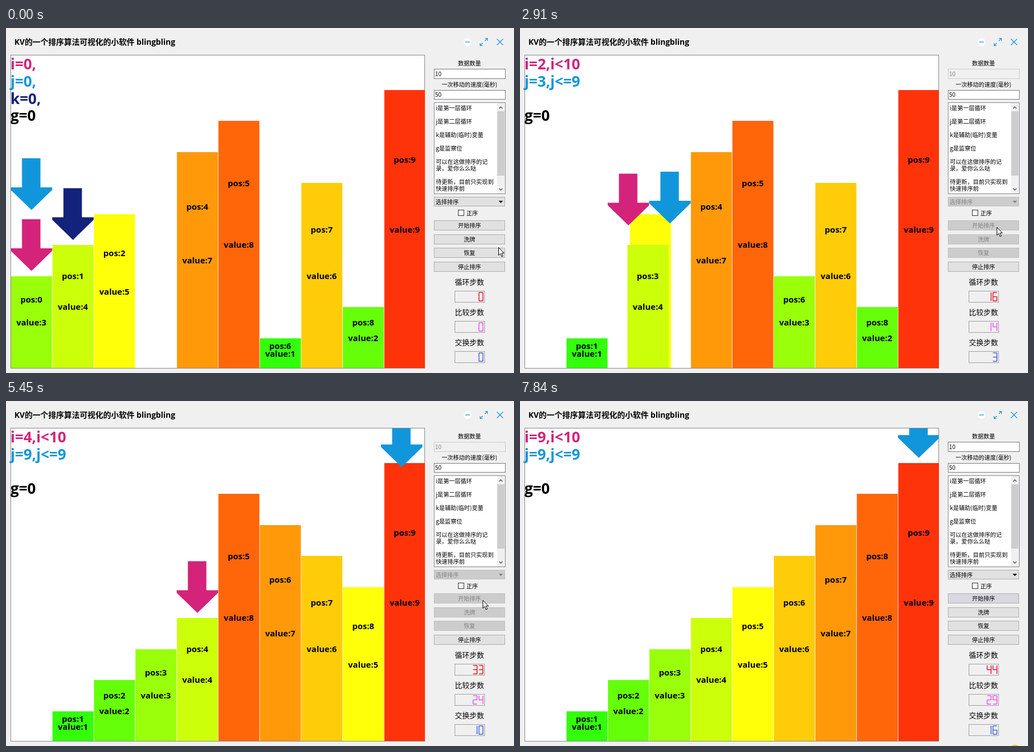
Animation of 907x617 px, one loop 8160 ms. Source, as an HTML page with a canvas:

```html
<!DOCTYPE html>
<html lang="zh">
<head>
<meta charset="utf-8">
<style>
html, body { margin: 0; width: 100%; height: 100%; overflow: hidden; background: #f0f0f0; }
canvas { display: block; }
</style>
</head>
<body>
<canvas id="stage" width="907" height="617"></canvas>
<script>
const ctx = document.getElementById('stage').getContext('2d');
const LOOP = 8160, TICK = 76.85;
const START = [3, 4, 5, 0, 7, 8, 1, 6, 2, 9];
const PINK = '#d4237a', BLUE = '#1296db', NAVY = '#13227a';
const CJK = '"Noto Sans CJK SC", "Noto Sans CJK JP", "Noto Sans CJK", sans-serif';
const BOLD = '"Open Sans", ' + CJK;
// Durations of the sorting steps, in ms
const MOVE = 77, SWAP = 184, NEXT = 24;
// [tick, sorting time] and [tick, x, y]
const CLOCK = [[10, 0], [29, 1385], [45, 2595], [56, 3420], [71, 4611], [84, 5605], [96, 6600]];
const MOUSE = [[0, 879, 392], [6, 851, 356], [79, 851, 356], [84, 849, 371], [87, 869, 440], [91, 905, 625]];

const clamp = v => Math.max(0, Math.min(1, v));
const barTop = v => 610.5 - 55.5 * v;
const tipOver = v => barTop(v) - 9.5;

function track(points, k, c = 1) {
  const n = points.findIndex(p => p[0] > k);
  if (n < 0) return points[points.length - 1][c];
  if (n === 0) return points[0][c];
  const a = points[n - 1], b = points[n];
  return a[c] + (b[c] - a[c]) * (k - a[0]) / (b[0] - a[0]);
}

// State of the exchange sort after `left` ms
function sortAt(left) {
  const a = [...START];
  const s = { a, i: 0, j: 0, done: 0, swaps: 0, slide: null,
    I: { p: 0, tip: tipOver(3) }, J: { p: 0, tip: tipOver(3) - 109 } };
  const take = d => { const f = clamp(left / d); left -= d; return f; };
  const glide = (arrow, p, v, f) => {
    arrow.p += (p - arrow.p) * f;
    arrow.tip += (tipOver(v) - arrow.tip) * f;
  };
  for (let i = 0; i < 10; i++) {
    s.i = i;
    if (i) {
      glide(s.I, i, a[i], take(NEXT));
      if (left < 0) return s;
    }
    for (let j = i + 1; j < 10; j++) {
      s.j = j;
      glide(s.J, j, a[j], clamp((take(MOVE) * MOVE - 20) / 40));
      if (left < 0) return s;
      if (a[i] > a[j]) {
        const g = clamp(take(SWAP) * SWAP / 150);
        glide(s.I, i, a[j], g);
        glide(s.J, j, a[i], g);
        if (g < 1) s.slide = { i, j, g };
        else [a[i], a[j]] = [a[j], a[i]];
        if (left < 0) return s;
        s.swaps++;
      }
      s.done++;
    }
  }
  return s;
}

function text(str, x, y, { size = 10.3, color = '#000', align = 'left', weight = 400, family = CJK, base = 'middle' } = {}) {
  ctx.font = `${weight} ${size}px ${family}`;
  ctx.fillStyle = color;
  ctx.textAlign = align;
  ctx.textBaseline = base;
  ctx.fillText(str, x, y);
}

function box(x, y, w, h, fill, border) {
  ctx.fillStyle = border;
  ctx.fillRect(x, y, w, h);
  ctx.fillStyle = fill;
  ctx.fillRect(x + 1, y + 1, w - 2, h - 2);
}

function path(points, x, y, close) {
  ctx.beginPath();
  points.forEach(([px, py]) => ctx.lineTo(x + px, y + py));
  if (close) ctx.closePath();
}

function line(points, x, y, color, width) {
  path(points, x, y);
  ctx.strokeStyle = color;
  ctx.lineWidth = width;
  ctx.stroke();
}

function arrow({ p, tip }, color) {
  path([[-17, -92.5], [16, -92.5], [16, -40.5], [37, -40.5], [37, -36], [0, 0], [-37, -36], [-37, -40.5], [-17, -40.5]],
    45.5 + 74.05 * p, tip, true);
  ctx.fillStyle = color;
  ctx.fill();
}

function bar(v, pos, p) {
  if (!v) return;
  const x = 9 + 74.05 * p, y = Math.round(barTop(v) - .2), h = 608 - y;
  ctx.fillStyle = `rgb(${Math.min(255, 51 * v)},${Math.min(255, 510 - 51 * v)},10)`;
  ctx.fillRect(x, y, 73.2, h);
  const style = { size: 15, weight: 700, family: BOLD, align: 'center', base: 'alphabetic' };
  text('pos:' + pos, x + 36.3, y + h / 4 + 6, style);
  text('value:' + v, x + 36.3, y + h / 2 + 6, style);
}

function drawChart(s, running) {
  box(8, 48, 740, 561, '#fff', '#828790');
  ctx.save();
  ctx.beginPath();
  ctx.rect(9, 49, 739, 559);
  ctx.clip();
  const { slide } = s;
  s.a.forEach((v, p) => { if (!slide || (p !== slide.i && p !== slide.j)) bar(v, p, p); });
  if (slide) {
    const { i, j, g } = slide;
    bar(s.a[i], i, i + (j - i) * g);
    bar(s.a[j], j, j - (j - i) * g);
  }
  arrow(s.I, PINK);
  arrow(s.J, BLUE);
  if (!running) arrow({ p: 1, tip: tipOver(4) }, NAVY);
  ctx.restore();
  const rows = running
    ? [`i=${s.i},i<10`, `j=${s.j},j<=9`, '', 'g=0']
    : ['i=0,', 'j=0,', 'k=0,', 'g=0'];
  rows.forEach((row, n) => text(row, 8, 74 + 30.8 * n,
    { size: 26.5, weight: 700, family: BOLD, color: [PINK, BLUE, NAVY, '#000'][n], base: 'alphabetic' }));
}

function drawTitle() {
  text('KV的一个排序算法可视化的小软件 blingbling', 15, 30, { size: 14, weight: 700, family: BOLD, base: 'alphabetic' });
  ctx.fillStyle = '#fff';
  ctx.beginPath();
  ctx.arc(824, 25, 7, 0, 7);
  ctx.fill();
  line([[-4, 0], [4, 0]], 824, 25, BLUE, 1.3);
  for (const d of [1, -1]) {
    line([[d * 2, -d * 2], [d * 6.5, -d * 6.5]], 853, 25, BLUE, 1.2);
    line([[d * 2, -d * 6.5], [d * 6.5, -d * 6.5], [d * 6.5, -d * 2]], 853, 25, BLUE, 1.2);
    line([[-5.5, -d * 5.5], [5.5, d * 5.5]], 882, 25, BLUE, 1.2);
  }
}

const SEGMENTS = [[0, 0, 1, 0], [1, 0, 1, 1], [1, 1, 1, 2], [0, 2, 1, 2], [0, 1, 0, 2], [0, 0, 0, 1], [0, 1, 1, 1]];
const DIGITS = [63, 6, 91, 79, 102, 109, 125, 7, 127, 111];

function counter(label, value, y, color) {
  text(label, 827.5, y, { size: 13, align: 'center' });
  box(801, y + 16, 54, 21, '#f0f0f0', '#a0a0a0');
  [...String(value)].reverse().forEach((d, n) => SEGMENTS.forEach(([x1, y1, x2, y2], bit) => {
    if (DIGITS[d] >> bit & 1)
      line([[x1 * 7, y1 * 7.5], [x2 * 7, y2 * 7.5]], 844.5 - 10.5 * n, y + 19, color, 1.5);
  }));
}

function drawPanel(s, off, settled) {
  const mid = { align: 'center' };
  const edge = off ? '#bfbfbf' : '#adadad', face = off ? '#ccc' : '#e1e1e1', ink = off ? '#838383' : '#000';
  text('数据数量', 827.5, 63, mid);
  box(764, 73, 128, 18, off ? '#f0f0f0' : '#fff', off ? '#ccc' : '#7a7a7a');
  text('10', 766, 82, { color: ink });
  text('一次移动的速度(毫秒)', 827.5, 101, mid);
  box(764, 111, 128, 17, '#fff', '#7a7a7a');
  text('50', 766, 119.5);

  box(764, 133, 128, 164, '#fff', '#828790');
  ctx.fillStyle = '#f0f0f0';
  ctx.fillRect(877, 134, 14, 162);
  ctx.fillStyle = '#cdcdcd';
  ctx.fillRect(877, 149, 13, 115);
  line([[-3, 2], [0, -1], [3, 2]], 883.5, 142, '#505050', 1.3);
  line([[-3, -2], [0, 1], [3, -2]], 883.5, 289, '#505050', 1.3);
  [['i是第一层循环', 143], ['j是第二层循环', 167], ['k是辅助(临时)变量', 191], ['g是监察位', 215],
    ['可以在这做排序的记', 239], ['录，爱你么么哒', 251], ['待更新，目前只实现到', 275], ['快速排序前', 287]]
    .forEach(([str, y]) => text(str, 767.5, y));

  box(764, 302, 127, 17, face, edge);
  text('选择排序', 767, 311, { color: ink });
  path([[-4, -2], [4, -2], [0, 2]], 883.5, 311, true);
  ctx.fillStyle = ink;
  ctx.fill();
  box(807, 325, 11, 11, '#fff', '#333');
  text('正序', 822, 331);

  ['开始排序', '洗牌', '恢复', '停止排序'].forEach((label, n) => {
    const y = 344 + Math.round(24.7 * n), grey = off && n < 3;
    const fill = grey ? '#ccc' : n === 0 && settled ? '#d9d8e1' : '#e1e1e1';
    box(764, y, 127, 18, fill, grey ? '#bfbfbf' : '#adadad');
    text(label, 827.5, y + 9.5, { ...mid, color: grey ? '#838383' : '#000' });
  });

  counter('循环步数', Math.max(0, s.done - 1), 454, '#e8102c');
  counter('比较步数', s.done - s.swaps, 508, '#f050f0');
  counter('交换步数', s.swaps, 562, '#4460e4');
}

function drawMouse(k) {
  path([[0, 0], [0, 14], [3.2, 11], [5.6, 16.5], [7.8, 15.5], [5.4, 10.2], [9.8, 10.2]],
    track(MOUSE, k, 1) + .5, track(MOUSE, k, 2) + .5, true);
  ctx.fillStyle = '#fff';
  ctx.fill();
  ctx.strokeStyle = '#000';
  ctx.lineWidth = 1;
  ctx.stroke();
}

function draw(now) {
  const k = Math.floor((now % LOOP + 10) / TICK);
  const running = k >= 8, finished = k >= 98;
  const s = sortAt(finished ? Infinity : track(CLOCK, k));
  ctx.fillStyle = '#f0f0f0';
  ctx.fillRect(0, 0, 907, 617);
  drawTitle();
  drawChart(s, running);
  drawPanel(s, running && !finished, k >= 101);
  if (k >= 102) {
    ctx.fillStyle = '#f5c84c';
    ctx.beginPath();
    ctx.arc(884, 624, 9.5, 0, 7);
    ctx.fill();
  }
  drawMouse(k);
}

const begin = performance.now();
function frame() {
  draw(performance.now() - begin);
  requestAnimationFrame(frame);
}
frame();
</script>
</body>
</html>
```
